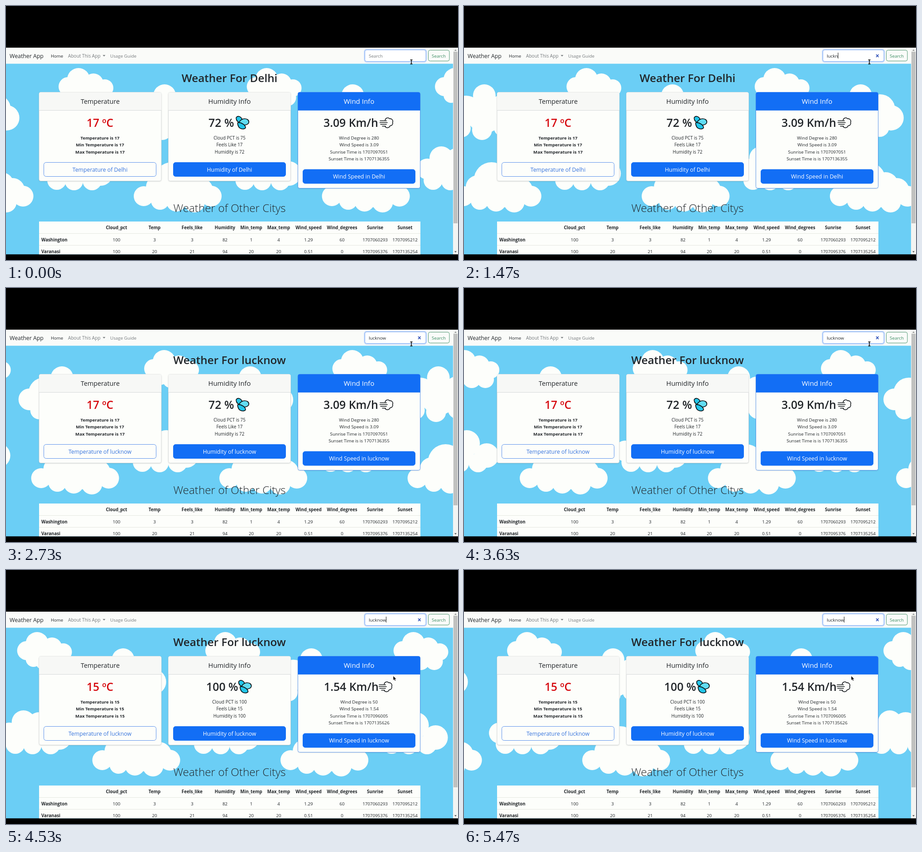
Recreate the animation shown at these times as an HTML page. Size 998x561 px, loop 5.51 s.

```html
<!DOCTYPE html>
<html lang="en">
<head>
<meta charset="utf-8">
<title>Weather App</title>
<style>
  html, body { margin: 0; width: 100%; height: 100%; overflow: hidden; background: #000; }
  svg { display: block; width: 998px; height: 561px; }
  text { font-family: "Open Sans", "Noto Sans", sans-serif; fill: #212529; white-space: pre; }
</style>
</head>
<body>
<svg id="stage" viewBox="0 0 998 561" xmlns="http://www.w3.org/2000/svg">
  <defs>
    <clipPath id="page"><rect y="92" width="998" height="456.5"/></clipPath>
    <clipPath id="skyArea"><rect y="127" width="987" height="422"/></clipPath>
    <filter id="soft" x="-5%" y="-5%" width="110%" height="112%">
      <feDropShadow dx="0" dy="1" stdDeviation="1.2" flood-opacity=".12"/>
    </filter>
    <g id="tile" fill="#fdfefb"></g>
  </defs>
  <rect width="998" height="561"/>
  <g clip-path="url(#page)">
    <g clip-path="url(#skyArea)">
      <rect y="127" width="987" height="422" fill="#6bcef5"/>
      <g id="sky"></g>
    </g>
    <g id="ui"></g>
    <g id="drops" stroke="#0b1215" stroke-width="1.7" fill="#22c6ea" stroke-linejoin="round">
      <path d="M522 257C513 259 507 253 508.500 246C513 241 523 245 522 257Z"/>
      <path d="M514.500 258C517 250 526 247 533 250.500C538 254 537 260 531 262C524 264 518 262 514.500 258Z" fill="#62dcf2"/>
      <path d="M511.500 257.500C520 257 529 263 529 269C526 273 518 272 514.500 268C512 264 511 261 511.500 257.500Z"/>
    </g>
    <g id="puff" stroke="#15191c" stroke-width="1.6" fill="#fdfefb" stroke-linecap="round" stroke-linejoin="round">
      <path d="M837 252C838 247 844 245.500 847 249C852 248 855.500 253 853.500 257C855 262 851 265 848 264.500C846 270 839 270 837 266"/>
      <path d="M826 253.500H840M825.500 257.500H842M827 261.500H840M831 265.500H838" fill="none"/>
    </g>
    <g id="beam" fill="none" stroke="#000" stroke-width="1.5">
      <path d="M-2.500 -4.500H2.500M0 -4.500V4.500M-2.500 4.500H2.500"/>
    </g>
    <path id="arrow" d="M0 0V9.500L2.200 7.600L3.800 11L5.400 10.200L3.900 7H6.700Z" fill="#000" stroke="#fff" stroke-width=".5"/>
  </g>
</svg>
<script>
const NS = "http://www.w3.org/2000/svg";
const LOOP = 5510, TILE = 415.5, DRIFT = 0.075;
const WHITE = "#fdfefb", BLUE = "#126ef5", GREY = "#777b7e", GREEN = "#3b8d62";
const $ = id => document.getElementById(id);
const ui = $("ui");

function add(parent, name, attrs) {
  const node = document.createElementNS(NS, name);
  for (const key in attrs) node.setAttribute(key, attrs[key]);
  return parent.appendChild(node);
}
const rect = (x, y, width, height, fill, more) => add(ui, "rect", { x, y, width, height, fill, ...more });
const path = (d, more) => add(ui, "path", { d, fill: "none", ...more });

function label(x, y, size, content, more) {
  const node = add(ui, "text", { x, y, "font-size": size, "text-anchor": "middle", ...more });
  node.textContent = content;
  return node;
}
const left = { "text-anchor": "start" };
const bold = { "font-weight": 700 };
const semi = { "font-weight": 600 };

// Each cloud is a cluster of round lobes: x, y, radius.
const clouds = [
  [[137,178,21], [160,162,25], [193,171,22], [218,181,19], [152,197,17], [176,201,20], [206,202,19]],
  [[278,246,24], [310,232,34], [350,198,25], [352,238,42], [393,228,33], [417,247,28], [300,270,20], [345,274,22], [392,268,21]],
  [[99,360,23], [130,336,26], [165,343,29], [209,370,27], [150,365,30], [112,385,21], [150,387,20], [190,386,21]],
  [[304,420,22], [335,400,26], [366,384,39], [405,395,28], [430,407,27], [453,420,23], [390,415,30], [340,430,20], [376,432,22], [416,433,23]]
];
clouds.flat().forEach(([cx, cy, r]) => add($("tile"), "circle", { cx, cy, r }));
for (let k = -2; k <= 2; k++) add($("sky"), "use", { href: "#tile", x: k * TILE });

// Navigation bar
rect(0, 92, 987, 35.500, "#fafbf9");
label(8, 114.500, 12.3, "Weather App", left);
label(99, 113.500, 9.6, "Home", left);
label(137, 113.500, 10.1, "About This App", { ...left, style: `fill:${GREY}` });
path("M213.500 108.200H219.500L216.500 111.400Z", { style: `fill:${GREY}` });
label(230, 113.500, 9.85, "Usage Guide", { ...left, style: `fill:${GREY}` });
rect(791.500, 96, 136.500, 27.500, "#fff", { rx: 5, stroke: "#c2d8fb", "stroke-width": 2.6 });
rect(792.500, 97, 134.500, 25.500, "#fff", { rx: 4, stroke: "#86b0f5", "stroke-width": 1 });
const hint = label(801, 113.500, 9.8, "Search", { ...left, style: `fill:${GREY}` });
const typed = label(801, 113.500, 9.85, "", left);
const caret = rect(0, 103, 1, 13, "#111");
const clear = path("M910 107L915.500 112.800M915.500 107L910 112.800", { stroke: "#2f50b8", "stroke-width": 1.7 });
rect(932.500, 97.500, 46.500, 24, "none", { rx: 4, stroke: GREEN, "stroke-width": 0.9 });
label(955.500, 113.500, 9.8, "Search", { style: `fill:${GREEN}` });

const title = label(493.5, 168.300, 24.3, "", semi);

// Cards
function card(x, height, heading, size, main) {
  const edge = main ? "#3f86ee" : "#cfd2d3", cx = x + 135;
  rect(x, 190.500, 270, height, WHITE, { rx: 4, stroke: edge, "stroke-width": 0.8, filter: "url(#soft)" });
  path(`M${x} 230.500V194.500q0 -4 4 -4H${x + 266}q4 0 4 4V230.500Z`, { style: `fill:${main ? BLUE : "#f7f8f6"}` });
  path(`M${x} 230.500H${x + 270}`, { stroke: edge, "stroke-width": 0.8 });
  label(cx, 216.200, size, heading, main ? { style: "fill:#fff" } : {});
}
function button(x, y, outline) {
  rect(x, y, 248, 31, outline ? WHITE : BLUE, { rx: 5, stroke: outline ? "#4a86ea" : BLUE, "stroke-width": 0.9 });
  return label(x + 124, y + 20.300, 12.3, "", { style: `fill:${outline ? "#3673dc" : "#fff"}` });
}
const lines = (x, count, size, more) =>
  Array.from({ length: count }, (_, i) => label(x, 294.500 + 15.65 * i, size, "", more));

card(73, 196, "Temperature", 14.3);
card(358.5, 196, "Humidity Info", 14.8);
card(644.5, 212, "Wind Info", 15, true);
const degrees = label(207.5, 267, 24.5, "", { ...semi, style: "fill:#d60a10" });
const humidity = label(0, 267, 24.9, "", { ...semi, ...left });
const wind = label(0, 267, 24.8, "", { ...semi, ...left });
const body = [
  ...lines(207.5, 3, 9.65, bold),
  ...lines(493.5, 3, 9.9, {}),
  ...lines(779.5, 4, 9.85, {})
];
const buttons = [button(83.5, 345.500, true), button(369.5, 345.500), button(655.5, 361)];

// Table
label(493.5, 455, 24.3, "Weather of Other Citys", { "font-weight": 300 });
rect(73, 476, 842, 73, WHITE);
path("M73 502.500H915M73 528.500H915", { stroke: "#e3e5df", "stroke-width": 0.9 });
const columns = [244, 328, 411, 483.5, 541.5, 602, 668, 742, 815, 881];
const row = (y, values, more) => values.split(" ").forEach((v, i) => label(columns[i], y, 9.75, v, more));
row(493, "Cloud_pct Temp Feels_like Humidity Min_temp Max_temp Wind_speed Wind_degrees Sunrise Sunset", bold);
label(78, 519.500, 9.7, "Washington", { ...left, ...bold });
row(519.5, "100 3 3 82 1 4 1.29 60 1707060293 1707095212");
label(78, 546, 9.7, "Varanasi", { ...left, ...bold });
row(546, "100 20 21 94 20 20 0.51 0 1707095376 1707135254");

// Scrollbar
rect(987, 92, 11, 457, "#f3f4f2");
rect(988, 101, 9, 379, "#c0c1c0");
path("M990 99L992.500 96L995 99Z", { style: "fill:#8a8c8c" });
path("M990 541.500L992.500 544.500L995 541.500Z", { style: "fill:#505252" });

const reports = [
  { temp: 17, hum: 72, cloud: 75, deg: 280, speed: "3.09", rise: 1707097051, set: 1707136355, humX: 447, windX: 701, dropX: 0, puffX: 0 },
  { temp: 15, hum: 100, cloud: 100, deg: 50, speed: "1.54", rise: 1707096005, set: 1707135626, humX: 442, windX: 702, dropX: 5.5, puffX: -2 }
];
const keyTimes = [450, 620, 950, 1180, 1400, 1750, 2080];
const CITY_AT = 2400, DATA_AT = 4050, MOVE_FROM = 4080, MOVE_TO = 4450;
const STALL = 210;

const write = (node, content) => { if (node.textContent !== content) node.textContent = content; };
const show = (node, on) => node.setAttribute("visibility", on ? "visible" : "hidden");
const move = (node, x, y) => node.setAttribute("transform", `translate(${x} ${y})`);

function showReport(r) {
  write(degrees, `${r.temp} ºC`);
  write(humidity, `${r.hum} %`);
  write(wind, `${r.speed} Km/h`);
  humidity.setAttribute("x", r.humX);
  wind.setAttribute("x", r.windX);
  move($("drops"), r.dropX, 0);
  move($("puff"), r.puffX, 0);
  [
    `Temperature is ${r.temp}`, `Min Temperature is ${r.temp}`, `Max Temperature is ${r.temp}`,
    `Cloud PCT is ${r.cloud}`, `Feels Like ${r.temp}`, `Humidity is ${r.hum}`,
    `Wind Degree is ${r.deg}`, `Wind Speed is ${r.speed}`,
    `Sunrise Time is ${r.rise}`, `Sunset Time is is ${r.set}`
  ].forEach((line, i) => write(body[i], line));
}

function draw(t) {
  // The sky pauses briefly while the search is submitted.
  const paused = Math.min(STALL, Math.max(0, t - (CITY_AT - STALL)));
  move($("sky"), DRIFT * (t - paused), 0);

  const keys = keyTimes.filter(k => k <= t);
  write(typed, "lucknow".slice(0, keys.length));
  show(hint, !keys.length);
  show(clear, keys.length);
  const lastKey = keys.length ? keys[keys.length - 1] : 200;
  show(caret, t >= lastKey && (t - lastKey) % 1000 < 500);
  caret.setAttribute("x", 801 + (keys.length ? typed.getComputedTextLength() : 0));

  const city = t < CITY_AT ? "Delhi" : "lucknow";
  write(title, `Weather For ${city}`);
  ["Temperature of", "Humidity of", "Wind Speed in"].forEach((s, i) => write(buttons[i], `${s} ${city}`));
  showReport(reports[t < DATA_AT ? 0 : 1]);

  const p = Math.min(1, Math.max(0, (t - MOVE_FROM) / (MOVE_TO - MOVE_FROM)));
  const ease = p * p * (3 - 2 * p);
  const x = 895 - 40 * ease, y = 123.5 + 110.5 * ease;
  show($("beam"), p === 0);
  show($("arrow"), p > 0);
  move($("beam"), x, y);
  move($("arrow"), x, y);
}

function tick() {
  draw(performance.now() % LOOP);
  requestAnimationFrame(tick);
}
tick();
</script>
</body>
</html>
```
